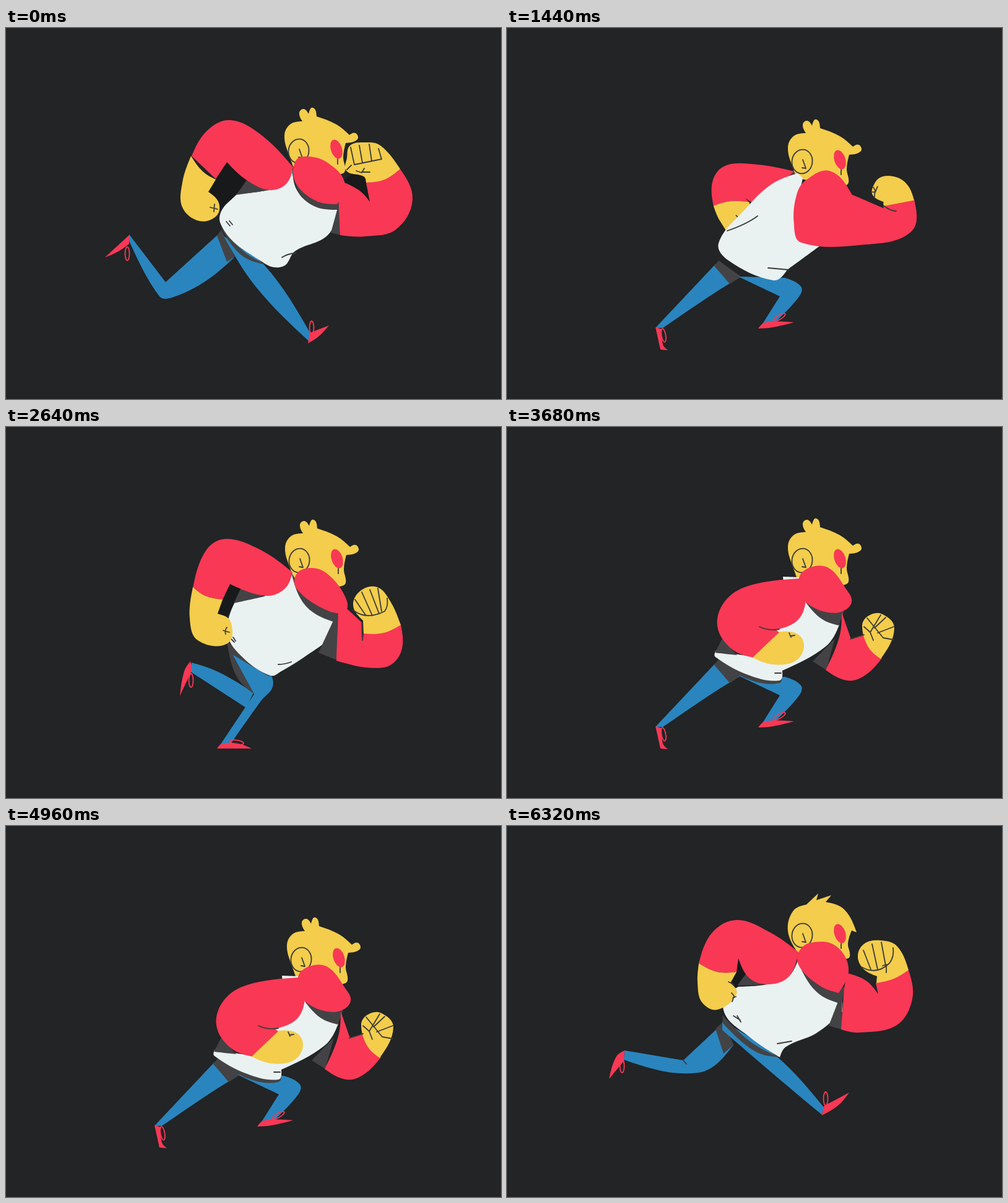
An HTML page with a canvas that plays this animation: 800x600 px, repeating every 6.4 s.

```html
<!DOCTYPE html>
<html lang="en">
<head>
<meta charset="utf-8">
<title>Runner</title>
<style>
html, body { margin: 0; width: 100%; height: 100%; overflow: hidden; background: #222426; }
canvas { display: block; }
</style>
</head>
<body>
<canvas id="stage" width="800" height="600"></canvas>
<script>
const STEP = 80;
const RED = '#f93855', SKIN = '#f3cd4b', WHITE = '#eaf1f1', BLUE = '#2a85be';
const GREY = '#434345', GAP = '#18191a', INK = '#3b3b38';
const ctx = document.getElementById('stage').getContext('2d');

// Closed smooth curve through "x y" points; a point ending in "!" is a corner.
function blob(color, text) {
  const pts = text.split(', ').map(p => ({ x: parseFloat(p), y: parseFloat(p.split(' ')[1]), corner: p.endsWith('!') }));
  const at = i => pts[(i + pts.length) % pts.length];
  const handle = (i, reach) => {
    const p = at(i), a = at(i - 1), b = at(i + 1);
    const k = reach / Math.hypot(b.x - a.x, b.y - a.y);
    return { x: p.x + (b.x - a.x) * k, y: p.y + (b.y - a.y) * k };
  };
  const middle = (a, b) => ({ x: (a.x + b.x) / 2, y: (a.y + b.y) / 2 });
  ctx.beginPath();
  ctx.moveTo(pts[0].x, pts[0].y);
  pts.forEach((p, i) => {
    const q = at(i + 1), reach = Math.hypot(q.x - p.x, q.y - p.y) * 0.35;
    let c1 = p.corner ? null : handle(i, reach);
    let c2 = q.corner ? null : handle(i + 1, -reach);
    c1 = c1 || middle(p, c2 || q);
    c2 = c2 || middle(q, c1);
    ctx.bezierCurveTo(c1.x, c1.y, c2.x, c2.y, q.x, q.y);
  });
  ctx.fillStyle = color;
  ctx.fill();
}

function ink(path) {
  ctx.strokeStyle = INK;
  ctx.stroke(new Path2D(path));
}

function oval(x, y, rx, ry, degrees) {
  ctx.beginPath();
  ctx.ellipse(x, y, rx, ry, degrees * Math.PI / 180, 0, 2 * Math.PI);
}

function shoe(shape, laceX, laceY, tilt = 0) {
  blob(RED, shape);
  oval(laceX, laceY, 3.5, 11, tilt);
  ctx.strokeStyle = RED;
  ctx.stroke();
}

function shifted(dx, dy, draw, degrees = 0, px = 0, py = 0) {
  ctx.save();
  ctx.translate(dx + px, dy + py);
  ctx.rotate(degrees * Math.PI / 180);
  ctx.translate(-px, -py);
  draw();
  ctx.restore();
}

const curlyHair = () => blob(SKIN, '458 225!, 451 195, 460 177, 480 172!, 475 158, 482 152, 490 160!, 497 150, 503 164!, 535 177, 556 194!, 566 191, 569 201, 550 207!, 546 230, 549 252, 540 258!, 465 245!');
const sweptHair = () => blob(SKIN, '470 205!, 454 170, 462 138, 484 127!, 503 109!, 500 120!, 524 112!, 515 123!, 545 135, 565 172!, 557 169!, 551 190, 554 211, 545 215!, 520 210!');

function head(hair, dx, dy, earX, earY) {
  shifted(dx, dy, hair);
  shifted(earX, earY, () => {
    oval(0, 0, 16.5, 19.5, 8);
    ctx.strokeStyle = INK;
    ctx.stroke();
    ink('M1 -3L6 11L0 10M63 13V21');
    oval(61, -3, 9, 16, -18);
    ctx.fillStyle = RED;
    ctx.fill();
  });
}

function reachLegs() {
  blob(BLUE, '190 363!, 285 379!, 350 318!, 366 354!, 309 399, 189 378!');
  ink('M284 378L290 385');
  blob(GREY, '337 328!, 350 316!, 366 354!, 350 368!');
  blob(BLUE, '348 316!, 434 371, 512 455!, 509 467!, 435 405, 348 330!');
  blob(GREY, '348 306!, 395 350, 441 374!, 400 364, 349 319!');
  shoe('190 363!, 176 374, 165 409!, 189 380!', 186, 388);
  shoe('512 453!, 553 431!, 535 452, 509 468!', 515, 441);
}

function reachBody() {
  blob(WHITE, '470 218!, 448 248, 372 260!, 350 298, 393 342, 441 374!, 451 357, 500 335, 542 300!, 542 285!, 500 262');
  ink('M437 352L460 348M366 307L377 314M372 307L378 317');
  blob(GAP, '374 214!, 364 254!, 371 262!, 393 242!');
  blob(GREY, '391 233!, 372 258!, 412 257!');
  blob(RED, '310 222!, 332 172, 372 152, 425 172, 471 204!, 456 243, 425 256, 393 247, 374 214!, 371 236!, 340 236');
  blob(SKIN, '310 222!, 340 236, 371 236!, 361 254!, 371 272, 340 297, 315 285, 308 255');
  ink('M358 252L366 256M363 270L367 275L364 284M365 278L370 276');
  blob(GREY, '470 220!, 500 268, 541 288!, 546 262!, 500 245');
  blob(GREY, '542 266!, 541 329!, 520 323!');
  blob(RED, '550 238!, 580 250, 600 272!, 596 254!, 625 245, 649 233!, 655 280, 630 322, 570 334, 540 329!, 545 262!');
  blob(RED, '471 205, 490 189, 530 193, 552 230, 536 270!, 505 258, 473 228');
  blob(SKIN, '567 209, 578 190, 603 185, 630 194, 649 233!, 625 247, 597 254!, 598 243!, 575 230');
  ink('M573 228Q597 242 618 222Q626 212 624 197M576 201L588 232M590 191L599 232M605 188L612 226M607 226L613 224V237');
}

function dropBackLeg() {
  blob(BLUE, '200 335!, 258 411!, 346 331!, 368 372!, 320 411, 268 436, 248 434, 198 342!');
  blob(GREY, '341 336!, 348 326!, 370 370!, 357 378!');
  shoe('200 334!, 160 371!, 182 361, 199 349!', 196, 365);
}

function dropFrontLeg() {
  blob(BLUE, '352 337!, 418 384, 492 494!, 490 507!, 405 420');
  shoe('491 493!, 522 481!, 505 499, 488 510!', 494, 485);
}

function dropBody() {
  blob(GREY, '346 320!, 385 362, 422 383!, 380 367');
  blob(WHITE, '463 228!, 470 262, 495 286, 536 293!, 520 335, 467 361, 449 385, 420 382, 347 317, 372 268!, 440 256');
  ink('M446 371Q455 365 468 364M356 313L362 320M361 312L366 318');
  blob(GAP, '357 217!, 328 265!, 344 296!, 372 270!, 389 247!');
  blob(GREY, '372 270!, 389 246!, 427 262!');
  blob(RED, '300 207!, 325 166, 362 149, 410 171, 464 225!, 452 253, 425 262, 389 246, 357 217!, 339 244!');
  blob(SKIN, '299 207!, 318 232, 339 245!, 327 265!, 344 283, 340 304, 312 312, 285 290, 285 250');
  ink('M330 290L342 293M337 285L336 297');
  blob(GREY, '462 232!, 475 268, 500 289, 536 294!, 538 280!');
  blob(GREY, '538 284!, 541 335!, 525 331!');
  blob(GAP, '546 246!, 560 236!, 583 240!, 588 283!');
  blob(RED, '536 246!, 570 262, 588 281!, 582 250!, 615 243, 637 228!, 657 278, 630 326, 580 337, 540 335!');
  blob(RED, '468 215, 490 208, 520 218, 547 249, 535 285!, 500 279, 468 250');
  blob(SKIN, '556 190, 580 185, 605 190, 637 228!, 612 245, 582 250!, 578 240, 550 231, 551 210');
  ink('M557 193L563 221L607 212L602 195M571 190L576 218M587 188L591 215M551 229L558 222M566 231L575 234L579 227M575 233H588');
}

function passLegs() {
  blob(BLUE, '300 381!, 345 397, 400 430!, 388 454!, 297 395!');
  blob(BLUE, '366 368!, 425 398, 431 420, 412 443, 362 514!, 345 516!, 401 432!');
  blob(GREY, '357 346!, 372 402, 401 432!, 366 368!, 428 405!, 385 370!');
  shoe('298 379!, 288 395, 281 435!, 301 392!', 299, 410);
  shoe('341 520!, 350 512, 375 512, 397 520!', 373, 510, 98);
}

function passBody() {
  blob(WHITE, '462 234!, 447 263, 371 280!, 358 335, 385 375, 428 402, 445 395, 485 370, 525 338, 536 300!, 490 285');
  ink('M440 384Q450 384 461 380M363 342L369 348M367 340L371 346');
  blob(GAP, '362 254!, 342 302!, 356 308!, 382 262!');
  blob(GREY, '380 260!, 368 285!, 418 274!');
  blob(RED, '302 260!, 323 200, 355 181, 410 198, 463 235!, 450 262, 420 273, 362 254!, 350 279!, 322 273');
  blob(SKIN, '302 259!, 322 273, 350 279!, 342 302!, 363 315, 358 350, 310 345, 297 310');
  ink('M351 329L361 332M357 324Q353 329 355 335');
  blob(GREY, '461 235!, 485 290, 535 317!, 538 298!, 500 285');
  blob(GREY, '536 298!, 535 377!, 505 365!');
  blob(RED, '537 296!, 549 292!, 575 316!, 577 345!, 578 334!, 610 331, 638 319!, 638 365, 610 389, 534 378!');
  blob(RED, '470 237, 495 228, 520 238, 547 272, 549 297, 520 297, 470 262');
  blob(SKIN, '561 288, 574 264, 600 259, 620 280, 638 320!, 610 333, 578 334!, 577 313!');
  ink('M561 296Q582 313 612 298Q618 290 616 277M564 279L581 304M575 267L592 305M588 263L603 302M601 261L607 298M575 317L576 345');
}

function pushLegs() {
  blob(BLUE, '240 485!, 335 384!, 341 379!, 375 404!, 330 432, 252 485!');
  blob(GREY, '335 385!, 342 376!, 378 402!, 360 414!');
  blob(BLUE, '374 402!, 449 404!, 475 418, 473 433, 434 475!, 409 485!, 441 434!');
  shoe('240 484!, 250 487!, 252 512, 260 521!, 248 520!', 253, 497, -10);
  shoe('406 486!, 418 476, 464 476!, 430 484', 440, 468, 60);
}

function pushBody() {
  blob(GREY, '340 376!, 390 408, 440 414, 444 396!, 400 380!');
  blob(WHITE, '446 242!, 472 243!, 485 283!, 537 320!, 515 355, 445 394!, 440 410, 390 401, 337 372, 337 362!, 400 372!, 450 290!');
  ink('M433 398H443');
  blob(GREY, '348 342!, 336 365!, 372 369!');
  blob(GREY, '483 284!, 508 310, 536 321!, 545 298!');
  blob(GREY, '530 342!, 516 393!, 494 379!');
  blob(RED, '541 300!, 556 343!, 576 337!, 606 374!, 578 402, 550 410, 515 393!, 537 340');
  blob(RED, '484 270!, 472 310, 435 328!, 441 333!, 398 373!, 362 358, 340 322, 352 282, 390 257, 472 245!');
  blob(SKIN, '441 331!, 470 335, 480 356, 465 379, 430 384, 397 373!');
  ink('M408 323Q422 330 440 327M456 333L459 340M458 338L465 337');
  blob(RED, '472 245, 490 227, 520 228, 548 262, 557 283, 540 299, 510 298, 483 284!');
  blob(SKIN, '574 322, 583 306, 605 302, 626 325, 604 375!, 584 356');
  ink('M555 343L577 336M582 309L608 341L625 344M577 323L587 332L604 304M587 332L592 345M594 325L612 308M599 333L625 323');
}

function stretchLegs() {
  blob(BLUE, '187 334!, 267 393!, 340 330!, 368 352!, 276 418, 260 416, 184 348!');
  blob(GREY, '335 335!, 342 325!, 376 345!, 360 357!');
  blob(BLUE, '455 354!, 500 403, 560 460!, 559 473!, 490 415, 455 388!');
  blob(GREY, '421 368!, 440 366!, 456 354!, 455 389!');
  shoe('185 331!, 152 377!, 172 365, 188 346!', 180, 363, 15);
  shoe('558 461!, 596 443!, 580 460, 558 475!', 556, 450, -15);
}

function farArm() {
  blob(GAP, '376 211!, 378 230!, 387 250!, 404 232!');
  blob(GREY, '460 193!, 474 197!, 392 243!, 388 231!');
  blob(RED, '323 208!, 335 168, 362 152, 410 166, 464 195!, 390 230!, 375 211!, 380 220!, 350 209');
  blob(SKIN, '323 208!, 350 209, 380 220!, 378 230!, 386 246, 372 270, 341 271, 326 237');
  ink('M333 256L386 245M340 255L343 270M354 252L360 274M368 249L375 267M353 234L359 246M358 239L375 234');
}

function torso() {
  blob(WHITE, '470 197!, 427 215, 385 255, 342 310, 358 338, 430 370, 453 353!, 509 312!, 470 240!, 478 205!');
  ink('M356 290Q388 279 405 266M422 350L455 353');
}

function nearArm() {
  blob(RED, '475 214, 508 189, 553 216!, 608 223!, 607 219!, 652 196!, 661 248, 590 290, 495 313, 475 285, 467 240');
  blob(SKIN, '582 195, 590 176, 615 169, 636 177, 652 197!, 607 220!, 605 213!, 586 208');
  ink('M607 219Q618 224 629 222M589 211L587 199L583 195M582 203L588 202L589 192');
}

function nearArmForward(dy, armTurn, backTurn, legs, face) {
  shifted(0, dy, farArm, backTurn, 460, 195);
  legs();
  face();
  shifted(0, dy, torso);
  shifted(0, dy, nearArm, armTurn, 500, 240);
}

const dropHead = () => head(curlyHair, -1, -21, 473, 199);
const passHead = () => head(curlyHair, 0, 0, 474, 216);
const pushHead = () => head(curlyHair, 3, -2, 477, 216);

const poses = [
  () => { dropBackLeg(); dropFrontLeg(); dropHead(); dropBody(); },
  () => { passLegs(); passHead(); passBody(); },
  () => nearArmForward(38, 16, -18, pushLegs, pushHead),
  () => nearArmForward(0, 0, 0, stretchLegs, () => head(sweptHair, 0, 0, 487, 175)),
  () => nearArmForward(20, 0, 0, () => { dropBackLeg(); shifted(20, 0, dropFrontLeg); }, dropHead),
  () => nearArmForward(40, 7, -6, passLegs, passHead),
  () => { pushLegs(); pushHead(); pushBody(); },
  () => { reachLegs(); head(sweptHair, 0, 0, 477, 177); reachBody(); }
];

function draw() {
  ctx.fillStyle = '#222426';
  ctx.fillRect(0, 0, 800, 600);
  ctx.lineWidth = 1.8;
  ctx.lineCap = ctx.lineJoin = 'round';
  poses[Math.floor(performance.now() / STEP) % poses.length]();
  requestAnimationFrame(draw);
}
draw();
</script>
</body>
</html>
```
